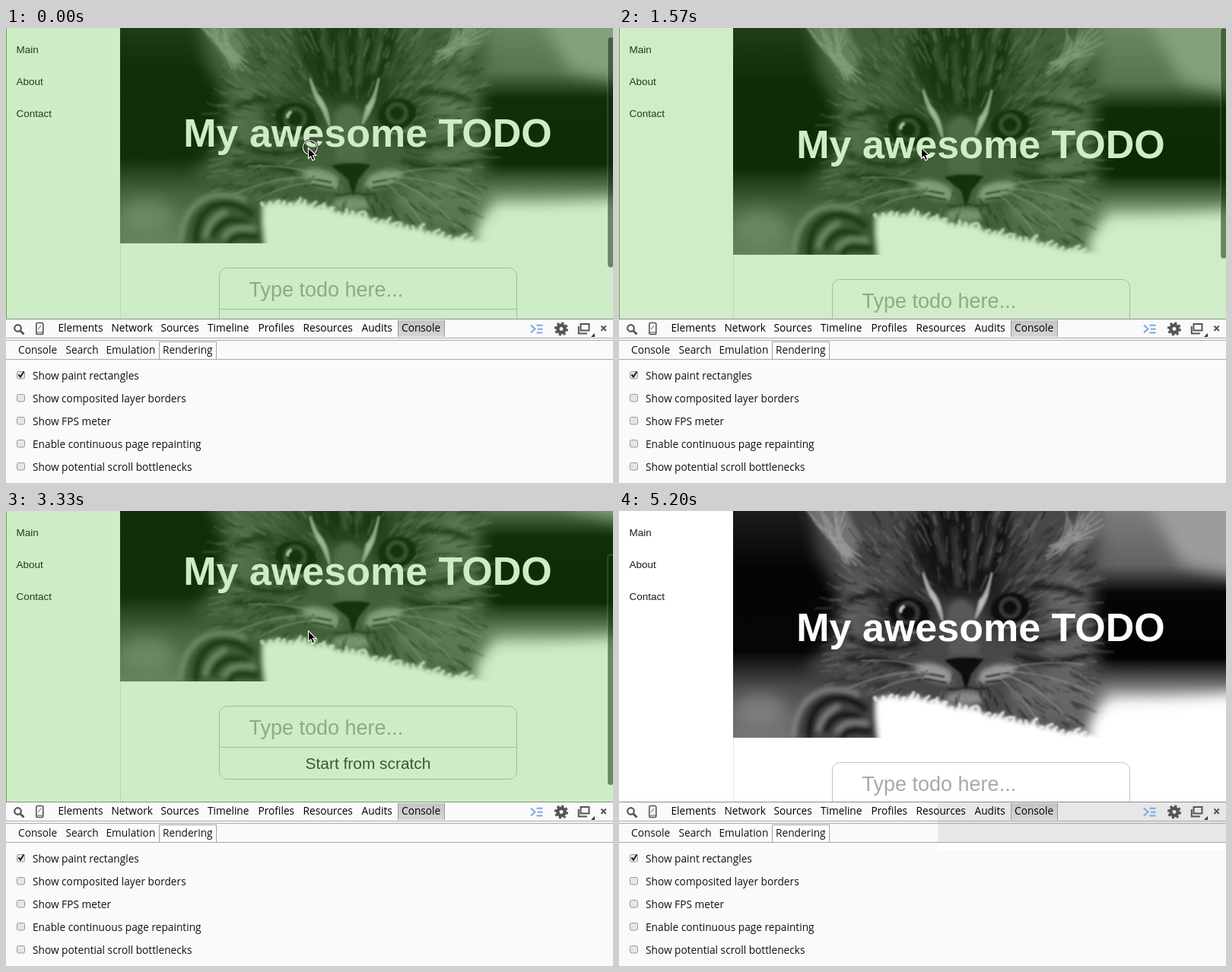
Write an HTML page that moves like this. It is 798 px wide and 598 px high and loops after 5710 ms.

```html
<!DOCTYPE html>
<html lang="en">
<head>
<meta charset="utf-8">
<title>My awesome TODO</title>
<style>
html, body { margin: 0; width: 100%; height: 100%; overflow: hidden; background: #fff; }
svg { display: block; width: 798px; height: 598px; }
.page text { font-family: "Liberation Sans", Arial, sans-serif; }
.tools text { font: 13.7px "Open Sans", "Noto Sans", sans-serif; fill: #111; }
.tools .tab { font-weight: 500; fill: #000; }
</style>
</head>
<body>
<svg viewBox="0 0 798 598" xmlns="http://www.w3.org/2000/svg">
<defs>
  <clipPath id="view"><rect width="798" height="382"/></clipPath>
  <clipPath id="photo"><rect x="150" width="648" height="298"/></clipPath>
  <filter id="b1" x="-20%" y="-20%" width="140%" height="140%"><feGaussianBlur stdDeviation="1"/></filter>
  <filter id="b3" x="-30%" y="-30%" width="160%" height="160%"><feGaussianBlur stdDeviation="3.2"/></filter>
  <filter id="b12" x="-40%" y="-40%" width="180%" height="180%"><feGaussianBlur stdDeviation="10"/></filter>
  <linearGradient id="left" x2="0" y2="1">
    <stop offset="0" stop-color="#1c1c1c"/><stop offset=".25" stop-color="#050505"/>
    <stop offset=".62" stop-color="#060606"/><stop offset=".78" stop-color="#4c4c4c"/><stop offset="1" stop-color="#747474"/>
  </linearGradient>
  <linearGradient id="right" x2="0" y2="1">
    <stop offset="0" stop-color="#7c7c7c"/><stop offset=".24" stop-color="#626262"/><stop offset=".36" stop-color="#060606"/>
    <stop offset=".65" stop-color="#020202"/><stop offset=".76" stop-color="#6c6c6c"/><stop offset=".86" stop-color="#dcdcdc"/><stop offset=".94" stop-color="#fff"/>
  </linearGradient>
  <radialGradient id="iris"><stop offset=".4" stop-color="#0c0c0c"/><stop offset=".75" stop-color="#3e3e3e"/><stop offset="1" stop-color="#161616"/></radialGradient>
  <linearGradient id="tab" x2="0" y2="1"><stop offset="0" stop-color="#c4c4c4"/><stop offset="1" stop-color="#d6d6d6"/></linearGradient>
</defs>

<rect width="798" height="598" fill="#fff"/>
<g class="page" clip-path="url(#view)">
  <path d="M150.5 0V382" stroke="#e6e6e6"/>
  <g id="body">
    <g clip-path="url(#photo)">
      <rect x="150" width="300" height="298" fill="url(#left)"/>
      <rect x="450" width="348" height="298" fill="url(#right)"/>
      <g filter="url(#b12)">
        <path d="M690 -20H820V88L740 70Z" fill="#9c9c9c"/>
        <path d="M245 -30L262 60 292 110 285 165 245 210 300 250 380 310H610L634 220 622 130 632 60 625 -30Z" fill="#464646"/>
        <ellipse cx="450" cy="50" rx="75" ry="72" fill="#1f1f1f"/>
        <ellipse cx="375" cy="135" rx="45" ry="30" fill="#242424"/>
        <ellipse cx="518" cy="130" rx="42" ry="30" fill="#222"/>
        <ellipse cx="312" cy="135" rx="24" ry="60" fill="#5a5a5a"/>
        <ellipse cx="588" cy="150" rx="32" ry="75" fill="#646464"/>
        <ellipse cx="575" cy="245" rx="62" ry="34" fill="#666"/>
        <ellipse cx="345" cy="205" rx="60" ry="22" fill="#4a4a4a"/>
        <ellipse cx="185" cy="265" rx="36" ry="24" fill="#7c7c7c"/>
      </g>
      <g filter="url(#b3)">
        <path d="M246 -5L300 75 318 40 296 -10Z" fill="#727272"/>
        <path d="M570 45L600 60 642 22 622 -10Z" fill="#6c6c6c"/>
        <path d="M398 0L420 80M428 -5L437 95M455 -5L454 100M484 -5L470 95M512 0L492 78" stroke="#0e0e0e" stroke-width="8" fill="none"/>
        <path d="M412 0L428 70M442 20L446 100M470 0L463 90M498 0L482 75M372 30L398 85M525 30L502 80" stroke="#4c4c4c" stroke-width="5" fill="none"/>
        <path d="M300 165Q350 190 395 172M520 165Q570 180 610 150M540 100Q570 95 612 110M300 120Q325 105 350 112M520 190Q565 205 615 190M300 195Q345 190 380 205" stroke="#1e1e1e" stroke-width="8" fill="none"/>
        <path d="M432 130Q448 100 468 130L474 190H434Z" fill="#585858"/>
        <path d="M388 205Q405 192 436 210L440 226Q405 230 388 205ZM524 206Q505 194 476 210L470 226Q505 228 524 206Z" fill="#979797"/>
        <ellipse cx="455" cy="246" rx="26" ry="9" fill="#8a8a8a"/>
      </g>
      <g id="fur" fill="none" filter="url(#b1)"/>
      <g filter="url(#b1)">
        <path d="M400 82Q404 106 416 122L425 143Q424 118 409 102ZM490 82Q484 108 474 118L469 140Q478 128 484 112Z" fill="#c4c4c4" stroke="#a0a0a0" stroke-width="3" stroke-linejoin="round"/>
        <ellipse cx="381" cy="134" rx="27" ry="20" fill="#0b0b0b" transform="rotate(14 381 134)"/>
        <ellipse cx="514" cy="128" rx="25" ry="20" fill="#0b0b0b" transform="rotate(-14 514 128)"/>
        <circle cx="380" cy="134" r="17" fill="url(#iris)"/>
        <circle cx="514" cy="127" r="16" fill="url(#iris)"/>
        <path d="M370 133a9 9 0 0 1 5-8" stroke="#ddd" stroke-width="3" fill="none"/>
        <path d="M358 152Q384 166 404 155M498 150Q514 158 534 146" stroke="#707070" stroke-width="3" fill="none"/>
        <path d="M428 196Q453 190 479 195L463 214 456 236 450 214Z" fill="#080808"/>
        <path d="M456 230Q446 236 432 234M456 230Q468 236 484 233M396 212L428 218M400 220L430 226M482 218L514 212M482 225L508 222" stroke="#222" stroke-width="2" fill="none"/>
        <path d="M408 213Q360 206 300 234M406 218Q360 220 322 246M410 208Q370 193 318 197M502 214Q550 226 592 276M500 219Q528 240 552 278M505 211Q560 210 625 240M505 208Q560 194 612 202" stroke="#a6a6a6" fill="none"/>
      </g>
      <g filter="url(#b3)">
        <path d="M226 300Q232 240 278 233Q326 232 344 258L350 300Z" fill="#424242"/>
        <path d="M250 300Q248 258 276 248Q300 240 326 262M270 290Q284 258 318 272M292 300Q296 282 332 290" stroke="#121212" stroke-width="10" fill="none"/>
        <path d="M230 298Q232 246 272 235Q300 232 316 242M262 290Q266 266 290 256M286 292Q296 272 328 280" stroke="#8c8c8c" stroke-width="5" fill="none"/>
        <path id="wool" fill="#fff"/>
      </g>
      <path d="M645 310Q620 262 650 250Q720 252 820 242V320Z" fill="#fff" filter="url(#b12)"/>
      <path id="tufts" fill="none" stroke="#fff" stroke-width="4" stroke-linecap="round" opacity=".75" filter="url(#b1)"/>
    </g>
    <text x="475.5" y="171" font-size="52" font-weight="700" text-anchor="middle" fill="#fff">My awesome TODO</text>
    <rect x="280.5" y="330.5" width="391" height="96" rx="10" fill="#fff" stroke="#c2c2c2"/>
    <path d="M281 384.5H671" stroke="#c2c2c2"/>
    <text x="319.5" y="368" font-size="27" fill="#a9a9a9">Type todo here...</text>
    <text x="476" y="413" font-size="20.9" text-anchor="middle" fill="#3c3c3c">Start from scratch</text>
  </g>
  <rect width="150" height="382" fill="#fff"/>
  <g font-size="13.5" fill="#1c1c1c">
    <text x="13.5" y="33">Main</text><text x="13.5" y="75">About</text><text x="13.5" y="117">Contact</text>
  </g>
  <rect id="thumb" x="791" width="8" height="303" rx="4" fill="#000" fill-opacity=".52" stroke="#fff" stroke-opacity=".3"/>
  <g id="full">
    <rect id="tint" width="798" height="382" fill="#34b00e"/>
    <path d="M.5 0V382" stroke="#58b426"/>
  </g>
  <g id="strip">
    <rect x="783" width="15" height="367" fill="#34b00e" fill-opacity=".24"/>
    <path d="M784 0V366H798" stroke="#58b426" stroke-width="2" fill="none"/>
  </g>
</g>

<g class="tools">
  <rect y="382" width="798" height="216" fill="#fafafa"/>
  <g id="shade">
    <rect x="419" y="383" width="379" height="53" fill="#e7e7e7"/>
    <rect x="419" y="436" width="379" height="9" fill="#fff"/>
  </g>
  <path d="M0 382.5H798" stroke="#8c8c8c"/>
  <path d="M0 407.5H798M0 410.5H798M0 435.5H798" stroke="#a8a8a8"/>
  <rect x="515" y="384" width="62" height="22" fill="url(#tab)"/>
  <path d="M515.5 384V406M576.5 384V406" stroke="#999"/>
  <path d="M201.5 435V412.5H276.5V435" fill="#fff" stroke="#a0a0a0"/>
  <g id="labels"></g>
  <g fill="none" stroke="#555">
    <circle cx="15.5" cy="394.5" r="4.3" stroke-width="2.2"/>
    <path d="M18.8 398L23.5 402.5" stroke-width="3"/>
    <rect x="39.8" y="387.5" width="9" height="15" rx="1.8" stroke-width="1.6"/>
    <path d="M42 396L46 391M41 400H48" stroke-width="1"/>
    <circle cx="730" cy="395.5" r="4.7" stroke-width="4.4"/>
    <circle cx="730" cy="395.5" r="7.6" stroke-width="3" stroke-dasharray="3.1 2.87"/>
    <rect x="755.5" y="389" width="11" height="8.5" stroke-width="2"/>
    <path d="M752.8 392V401.5H764" stroke-width="2"/>
    <path d="M774 401V406H769Z" fill="#333" stroke="none"/>
    <path d="M782.5 391.5L788.8 398M788.8 391.5L782.5 398" stroke-width="2"/>
    <path d="M690 390.5L695.5 395.5 690 400.5M697.5 390.8H705.5M699 395.7H705.5M697.5 400.6H705.5" stroke="#78a8e6" stroke-width="2"/>
  </g>
</g>

<g id="ring" fill="none">
  <circle cx="399.8" cy="157" r="9.5" stroke="#111" stroke-width="2.6"/>
  <circle cx="399.8" cy="157" r="9.5" stroke="#fff" stroke-width="1.2"/>
</g>
<path id="arrow" d="M.5 .5V14.5L3.7 11.6 6 17 8.8 15.8 6.5 10.5H10.8Z" fill="#000" stroke="#fff" stroke-width="1.1"/>
</svg>
<script>
const LOOP = 5710;
const $ = id => document.getElementById(id);
const show = (id, on) => $(id).setAttribute('visibility', on ? 'visible' : 'hidden');

// seeded random numbers
let seed = 7;
const rnd = () => (seed = (seed * 16807) % 2147483647) / 2147483647;

function drawFur() {
  const tones = ['#101010', '#2a2a2a', '#606060', '#7c7c7c'];
  const paths = tones.map(() => '');
  for (let i = 0; i < 1000; i++) {
    const a = rnd() * Math.PI * 2, r = 50 + 145 * Math.sqrt(rnd());
    const x = 453 + Math.cos(a) * r * .92, y = 165 + Math.sin(a) * r;
    const l = 8 + rnd() * 16, b = a + (rnd() - .5) * .5;
    paths[i % 4] += `M${x.toFixed(1)} ${y.toFixed(1)}l${(Math.cos(b) * l).toFixed(1)} ${(Math.sin(b) * l).toFixed(1)}`;
  }
  const coat = paths.map((d, i) => `<path d="${d}" stroke="${tones[i]}" stroke-width="2" opacity=".5"/>`).join('');
  // long pale hairs in the ears
  let hair = '';
  for (let i = 0; i < 16; i++) {
    hair += `M${296 + rnd() * 24} ${72 - rnd() * 20}Q${272 + rnd() * 20} 40 ${242 + i * 4} ${i % 5 * 6 - 8}`;
    hair += `M${560 + rnd() * 25} ${45 + rnd() * 20}Q${590 + rnd() * 15} 38 ${585 + i * 3.6} ${i % 6 * 8 - 6}`;
  }
  $('fur').innerHTML = coat + `<path d="${hair}" stroke="#b0b0b0" stroke-width="1.6" opacity=".6"/>`;
}

function drawWool() {
  let edge = 'M342 310L338 272', tufts = '';
  for (let x = 338; x <= 620; x += 9) {
    const y = 245 + Math.max(0, x - 390) * .22 + (rnd() - .5) * 6;
    edge += `L${x} ${y}`;
    tufts += `M${x} ${y + 3}q${rnd() * 8 - 4} -4 ${rnd() * 10 - 2} ${-2 - rnd() * 5}`;
  }
  $('wool').setAttribute('d', edge + 'L650 310Z');
  $('tufts').setAttribute('d', tufts);
}

function drawLabels() {
  const text = (x, y, s, name = 'option') => `<text class="${name}" x="${x}" y="${y}">${s}</text>`;
  const tabs = { Elements: 68.5, Network: 138.5, Sources: 203.5, Timeline: 265, Profiles: 331.5, Resources: 390.5, Audits: 467.5, Console: 520 };
  const subs = { Console: 16, Search: 78.5, Emulation: 131.5, Rendering: 206 };
  const options = ['Show paint rectangles', 'Show composited layer borders', 'Show FPS meter',
    'Enable continuous page repainting', 'Show potential scroll bottlenecks'];
  let out = '';
  for (const k in tabs) out += text(tabs[k], 399, k, 'tab');
  for (const k in subs) out += text(subs[k], 428, k);
  options.forEach((s, i) => {
    const y = 451 + i * 30;
    out += text(35, y + 11, s) +
      `<rect x="14.5" y="${y + .5}" width="10" height="9.5" rx="2" fill="#e6e6e6" stroke="#999"/>`;
  });
  $('labels').innerHTML = out + '<path d="M16.5 455.5L19 458.5 23.5 451.5" fill="none" stroke="#222" stroke-width="2"/>';
}

// bursts of redraws: first, last, count
const bursts = [[60, 610, 7], [700, 1250, 7], [1370, 1870, 6], [1960, 2490, 7], [2580, 3150, 7],
  [3240, 3780, 7], [3870, 4380, 6], [4500, 5020, 10], [5080, 5200, 3]];
function stepTime(t) {
  let q = 0;
  for (const [a, b, n] of bursts) {
    if (t < a) break;
    const d = (b - a) / (n - 1);
    q = a + d * Math.min(n - 1, Math.floor((t - a) / d + 1e-6));
  }
  return q;
}

const ease = u => u * u * (3 - 2 * u);
function track(keys, t) {
  for (let i = 1; i < keys.length; i++) {
    const [t0, a] = keys[i - 1], [t1, b] = keys[i];
    if (t < t1) return a + (b - a) * ease(Math.max(0, (t - t0) / (t1 - t0)));
  }
  return keys[keys.length - 1][1];
}
const scrollKeys = [[-196, 0], [480, 75], [1000, 75], [1470, 0], [1640, 0], [2080, 75], [2290, 75],
  [2780, 0], [2820, 0], [3370, 75], [3480, 75], [3960, 0]];
const scrollAt = t => Math.round(track(scrollKeys, t));
const xKeys = [[4440, 397], [4740, 419], [5100, 800]];
const yKeys = [[4440, 157], [4740, 428], [5100, 56]];

function render(t) {
  const q = stepTime(t), s = scrollAt(q);
  $('body').setAttribute('transform', `translate(0 ${-s})`);
  $('thumb').setAttribute('y', s * .775);
  const fade = 1 - Math.min(1, Math.max(0, (q - 4450) / 700));
  $('thumb').setAttribute('opacity', fade);
  $('strip').setAttribute('opacity', fade);
  $('tint').setAttribute('fill-opacity', q > 0 && s === scrollAt(q - 90) ? .226 : .24);
  show('full', q < 4150);
  show('strip', q >= 4150);
  show('shade', q >= 4770);
  show('ring', q < 60);
  show('arrow', q < 5080);
  $('arrow').setAttribute('transform', `translate(${track(xKeys, q)} ${track(yKeys, q)})`);
}

drawFur();
drawWool();
drawLabels();
const start = performance.now();
function tick() {
  render((performance.now() - start) % LOOP);
  requestAnimationFrame(tick);
}
tick();
</script>
</body>
</html>
```
